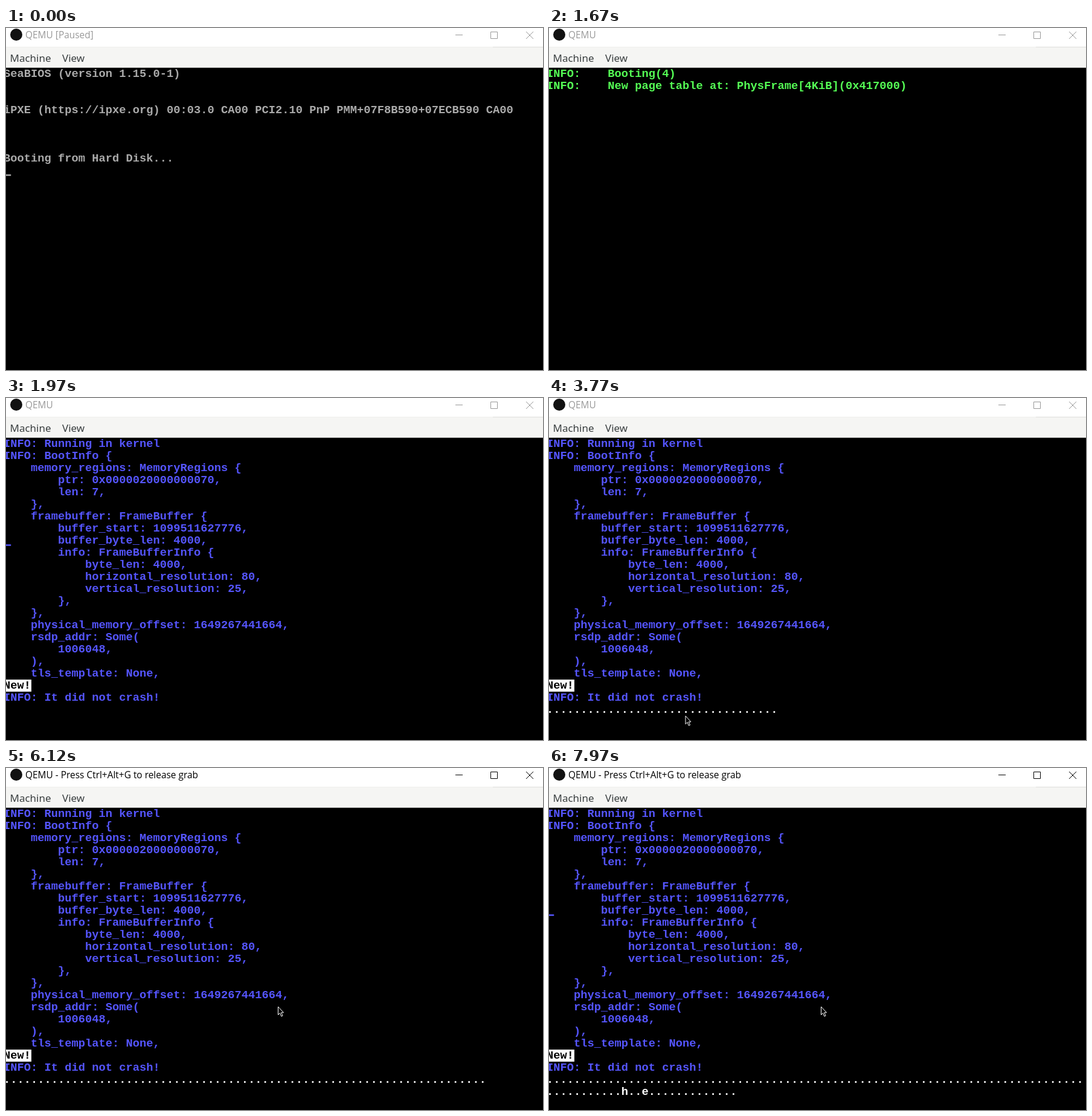
Write an HTML page with a canvas that moves like this. It is 889 by 566 pixels and loops after 8000 ms.

```html
<!DOCTYPE html>
<html lang="en">
<head>
<meta charset="utf-8">
<title>Kernel boot</title>
<style>
  html, body { margin: 0; width: 100%; height: 100%; overflow: hidden; background: #000; }
  canvas { display: block; }
</style>
</head>
<body>
<canvas id="stage" width="889" height="566"></canvas>
<script>
const ctx = document.getElementById('stage').getContext('2d');
const LOOP = 8000, COLS = 80, CELL_W = 11.25, CELL_H = 20, LEFT = -3, TOP = 66;
const GRAY = '#aaaaaa', GREEN = '#55ff55', BLUE = '#5555ff', WHITE = '#ffffff';

const BIOS = [
  'SeaBIOS (version 1.15.0-1)', '', '',
  'iPXE (https://ipxe.org) 00:03.0 CA00 PCI2.10 PnP PMM+07F8B590+07ECB590 CA00',
  '', '', '', 'Booting from Hard Disk...'
];

const segment = (flags, offset, addr, size) =>
  `Handling Segment: Ph64(ProgramHeader64 { type_: Ok(Load), flags: Flags(${flags}), offset: ${offset}, ` +
  `virtual_addr: ${addr}, physical_addr: ${addr}, file_size: ${size}, mem_size: ${size}, align: 1000 })`;

// Log messages wrap at the right edge of the 80-column screen.
const LOADER = [
  'Booting(4)',
  'New page table at: PhysFrame[4KiB](0x417000)',
  'Elf file loaded at 0x0000000000419000',
  segment(4, '0', '0', '4cf4'),
  segment(5, '4d00', '5d00', '14a21'),
  segment(6, '19728', '1b728', '1a58'),
  segment(6, '1b180', '1e180', '2e0'),
  'Entry point at: 0x8000006d40',
  'Creating GDT at PhysFrame[4KiB](0x44b000)',
  'Map framebuffer',
  'Map physical memory',
  'Allocate bootinfo',
  'Create Memory Map',
  'Create bootinfo',
  'Jumping to kernel entry point at VirtAddr(0x8000006d40)'
].flatMap(message => ('INFO:    ' + message).match(/.{1,80}/g));

const KERNEL = `INFO: Running in kernel
INFO: BootInfo {
    memory_regions: MemoryRegions {
        ptr: 0x0000020000000070,
        len: 7,
    },
    framebuffer: FrameBuffer {
        buffer_start: 1099511627776,
        buffer_byte_len: 4000,
        info: FrameBufferInfo {
            byte_len: 4000,
            horizontal_resolution: 80,
            vertical_resolution: 25,
        },
    },
    physical_memory_offset: 1649267441664,
    rsdp_addr: Some(
        1006048,
    ),
    tls_template: None,

INFO: It did not crash!`.split('\n');

// [time, value...] keys; equal times make a jump.
const TICKS = [[2000, 1], [3480, 29], [3570, 29], [3570, 30], [3770, 34], [4350, 44], [4630, 44],
  [4630, 46], [4900, 51], [5160, 51], [5160, 53], [5960, 68], [6120, 71], [7610, 101], [7970, 108]];
const POINTER = [[3670, 190, 566], [3770, 225, 526], [3800, 240, 516], [4080, 450, 394.5]];
const TYPED = { 91: 'h', 94: 'e' };

function sample(keys, t) {
  const next = keys.findIndex(key => key[0] > t);
  if (next < 0) return keys[keys.length - 1].slice(1);
  const a = keys[next - 1], b = keys[next];
  const k = (t - a[0]) / (b[0] - a[0]);
  return a.slice(1).map((v, i) => v + (b[i + 1] - v) * k);
}

function rect(x, y, w, h, color) {
  ctx.fillStyle = color;
  ctx.fillRect(x, y, w, h);
}

function print(text, row, color) {
  ctx.font = 'bold 18.75px "Liberation Mono", monospace';
  ctx.fillStyle = color;
  [...text].forEach((ch, col) => {
    if (ch !== ' ') ctx.fillText(ch, LEFT - 0.9 + col * CELL_W, TOP + row * CELL_H + 15);
  });
}

const printLines = (lines, color) => lines.forEach((line, row) => print(line, row, color));

const drawCursor = color => rect(LEFT, TOP + 8 * CELL_H + 16.25, CELL_W, 2.5, color);

function label(text, x, y, font, color) {
  ctx.font = font;
  ctx.fillStyle = color;
  ctx.fillText(text, x, y);
}

function drawWindow(title, color) {
  rect(0, 0, 889, 31, '#ffffff');
  rect(0, 31, 889, 35, '#f5f5f3');
  rect(0, 31, 806, 1, '#f0f0ee');
  rect(806, 31, 83, 1, '#dededc');
  rect(0, 65, 889, 1, '#b8b8b5');

  ctx.fillStyle = '#111111';
  ctx.beginPath();
  ctx.arc(17, 11, 10, 0, Math.PI * 2);
  ctx.fill();

  label(title, 32, 17, '15.45px "Open Sans", sans-serif', color);
  label('Machine', 6.5, 56, '17px "Noto Sans", sans-serif', '#3a3f40');
  label('View', 93, 56, '17px "Noto Sans", sans-serif', '#3a3f40');

  ctx.strokeStyle = color;
  ctx.lineWidth = 1;
  ctx.stroke(new Path2D('M744 11.5H756M802.5 6.5H813.5V17.5H802.5ZM861 6L873 18M873 6L861 18'));
}

function drawPointer(x, y) {
  ctx.save();
  ctx.translate(x, y);
  const arrow = new Path2D('M.5 .5V14L3.5 11L5.8 16.5L8 15.5L5.7 10.3H9.5Z');
  ctx.fillStyle = '#000000';
  ctx.fill(arrow);
  ctx.strokeStyle = WHITE;
  ctx.lineWidth = 1;
  ctx.stroke(arrow);
  ctx.restore();
}

// The text cursor stands still while the display stalls.
function cursorVisible(t) {
  if (t > 4350 && t < 4630) t = 4350;
  if (t > 4900 && t < 5160) t = 4900;
  return Math.floor((t - 1857) / 270) % 2 === 0;
}

function drawKernel(t) {
  printLines(KERNEL, BLUE);
  rect(0, TOP + 20 * CELL_H, LEFT + 4 * CELL_W, CELL_H, WHITE);
  print('New!', 20, '#000000');
  if (cursorVisible(t)) drawCursor(BLUE);
  if (t < 2000) return;
  const count = Math.floor(sample(TICKS, t)[0] + 1e-6);
  const ticks = Array.from({ length: count }, (_, i) => TYPED[i] || '.').join('');
  print(ticks.slice(0, COLS), 22, WHITE);
  print(ticks.slice(COLS), 23, WHITE);
}

function draw(t) {
  rect(0, 0, 889, 566, '#000000');
  if (t < 1420) {
    printLines(BIOS, GRAY);
    drawCursor(GRAY);
  } else if (t < 1920) {
    const rows = t < 1470 ? 0 : t < 1670 ? 1 : t < 1750 ? 2 : LOADER.length;
    printLines(LOADER.slice(0, rows), GREEN);
  } else {
    drawKernel(t);
  }

  const active = t >= 4200;
  const suffix = active ? ' - Press Ctrl+Alt+G to release grab' : t < 1390 ? ' [Paused]' : '';
  drawWindow('QEMU' + suffix, active ? '#000000' : '#999999');
  if (t >= POINTER[0][0]) drawPointer(...sample(POINTER, t));
}

const start = performance.now();
function frame() {
  draw((performance.now() - start) % LOOP);
  requestAnimationFrame(frame);
}
frame();
</script>
</body>
</html>
```
